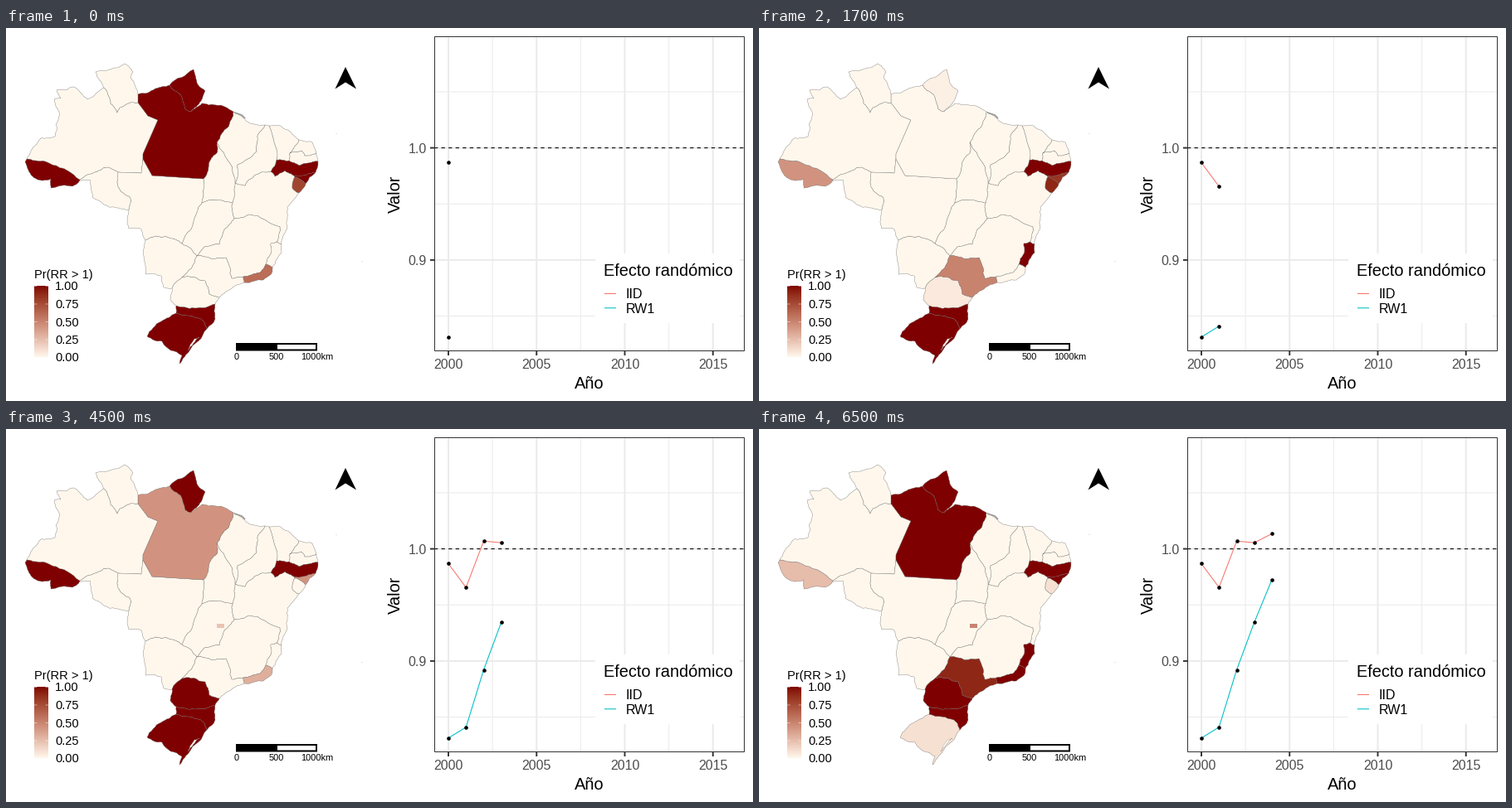
A matplotlib script for the animation above (8 s loop, 900x450 px).

```python
import random
from itertools import combinations

import matplotlib.pyplot as plt
import numpy as np
from matplotlib.animation import FuncAnimation
from matplotlib.colors import ListedColormap, to_rgb
from matplotlib.patches import Polygon, Rectangle

WIDTH, HEIGHT = 900, 450
plt.rcParams.update({"font.family": "Liberation Sans", "path.snap": False})
random.seed(7)

# Points where three or more areas meet; any two junctions that share
# two areas are the ends of the border between those areas.
JUNCTIONS = {
    "AM RR land": (118, 72), "PA RR land": (159, 80), "AM PA RR": (159, 90),
    "AP PA land": (197, 69), "AP land sea": (226, 50), "AP PA sea": (223, 101),
    "MA PA sea": (274, 101), "MA PI sea": (312, 117), "CE PI sea": (317, 118),
    "CE RN sea": (353, 135), "PB RN sea": (374, 151), "PB PE sea": (376, 161),
    "AL PE sea": (373, 174), "AL SE sea": (361, 188), "BA SE sea": (353, 199),
    "BA ES sea": (332, 261), "ES RJ sea": (321, 289), "RJ SP sea": (287, 307),
    "PR SP sea": (257, 325), "PR SC sea": (252, 333), "RS SC sea": (242, 363),
    "RS land sea": (209, 405), "RS SC land": (205, 344), "PR SC land": (205, 335),
    "MS PR land": (200, 314), "MS MT land": (168, 256), "MT RO land": (148, 219),
    "AC RO land": (89, 184), "AC AM land": (25, 158), "AC AM RO": (89, 183),
    "AM MT RO": (135, 174), "AM MT PA": (165, 158), "MT PA TO": (238, 182),
    "GO MT TO": (236, 211), "GO MS MT": (212, 260), "GO MG MS SP": (230, 275),
    "MS PR SP": (212, 301), "MG RJ SP": (286, 300), "ES MG RJ": (313, 285),
    "BA ES MG": (326, 258), "BA GO MG": (275, 230), "BA GO TO": (273, 211),
    "BA MA PI TO": (276, 187), "MA PA TO": (254, 138), "BA PE PI": (319, 173),
    "CE PE PI": (326, 159), "CE PB PE": (341, 160), "CE PB RN": (342, 151),
    "AL BA PE": (345, 177), "AL BA SE": (348, 180),
}
# Main bends between the two junctions of a border.
OUTER_BENDS = {
    "AM land": [(112, 76), (98, 86), (82, 71), (61, 75), (66, 85), (58, 86), (64, 101),
                (59, 131), (42, 133), (30, 148)],
    "RR land": [(108, 53), (143, 43), (153, 53), (150, 60)],
    "PA land": [(180, 73)],
    "AP sea": [(231, 68), (240, 76), (235, 88)],
    "PA sea": [(236, 91), (253, 93)],
    "MA sea": [(289, 112)],
    "CE sea": [(331, 118)],
    "RN sea": [(369, 138)],
    "BA sea": [(339, 216), (339, 240)],
    "ES sea": [(332, 271)],
    "RJ sea": [(320, 296), (310, 304)],
    "SP sea": [(272, 314)],
    "SC sea": [(252, 351)],
    "RS sea": [(220, 391)],
    "RS land": [(212, 395), (188, 378), (170, 372), (187, 354)],
    "PR land": [(198, 328)],
    "MS land": [(190, 313), (187, 299), (168, 297), (166, 275)],
    "MT land": [(163, 243), (148, 242)],
    "RO land": [(133, 217), (104, 204), (101, 183)],
    "AC land": [(80, 191), (54, 193), (54, 182), (38, 183), (30, 177), (23, 161)],
}
INNER_BENDS = {
    "AC AM": [(56, 165)],
    "AM RR": [(126, 91), (134, 102), (137, 96)],
    "AM PA": [(171, 106), (183, 111), (165, 152)],
    "AM RO": [(112, 172), (123, 168)],
    "AM MT": [(163, 175)],
    "AP PA": [(210, 80), (216, 98)],
    "MT RO": [(149, 204), (135, 192)],
    "MT PA": [(176, 178)],
    "MS MT": [(180, 251), (204, 255)],
    "GO MT": [(229, 225)],
    "GO MG": [(239, 264), (257, 261), (264, 242)],
    "PA TO": [(246, 160), (255, 149)],
    "MA PA": [(268, 119)],
    "MA TO": [(262, 150)],
    "MA PI": [(303, 130), (302, 149), (279, 165)],
    "BA PI": [(288, 190), (299, 178)],
    "PB RN": [(360, 154), (356, 148)],
    "PB PE": [(353, 166)],
    "BA PE": [(324, 179), (336, 172)],
    "AL PE": [(357, 178)],
    "BA SE": [(345, 193)],
    "BA MG": [(330, 240), (293, 225)],
    "ES MG": [(319, 272), (319, 260)],
    "MG RJ": [(306, 295)],
    "MG SP": [(265, 277), (272, 302)],
    "PR SP": [(245, 321), (240, 305)],
    "PR SC": [(227, 338)],
    "RS SC": [(235, 351)],
}
STRAIGHT = {"AM PA", "AM MT", "MT PA", "PA RR"}

# Probability per region and year; regions not named are zero.
USUAL = dict(AC=1, PA=1, AP=1, PE=1, AL=1, SC=1, RS=1)
YEARS = [
    dict(USUAL, SE=.78, RJ=.6),
    dict(USUAL, AC=.43, PA=0, AP=.03, AL=.84, SE=.9, ES=1, SP=.5, PR=.06),
    dict(USUAL, SE=.12, ES=.11, RJ=.06, SP=1, PR=1),
    dict(USUAL, PA=.43, AL=.43, DF=.22, RJ=.31, PR=1),
    dict(USUAL, AC=.25, SE=.1, DF=.5, ES=1, RJ=1, SP=.9, PR=1, RS=.1),
]
SERIES = [
    ([.9868, .9656, 1.0069, 1.0055, 1.0135], "#F8766D", "IID"),
    ([.8313, .8410, .8921, .9345, .9726], "#00BFC4", "RW1"),
]


def lab_gradient(low, high, steps=256):
    """Blend two colours evenly in CIE Lab, which is linear in the cube roots of XYZ."""
    to_xyz = np.array([[.4124, .3576, .1805], [.2126, .7152, .0722], [.0193, .1192, .9505]])
    white = to_xyz.sum(axis=1)

    def roots(color):
        linear = ((np.array(to_rgb(color)) + .055) / 1.055) ** 2.4
        return np.cbrt(to_xyz @ linear / white)

    blend = np.linspace(roots(low), roots(high), steps)
    linear = np.clip((white * blend ** 3) @ np.linalg.inv(to_xyz).T, 0, 1)
    return ListedColormap(np.clip(1.055 * linear ** (1 / 2.4) - .055, 0, 1))


cmap = lab_gradient("#FFF7EC", "#7F0000")


def roughen(points, depth=3):
    """Displace midpoints so an edge looks like a river or a coast."""
    for _ in range(depth):
        finer = [points[0]]
        for (x0, y0), (x1, y1) in zip(points, points[1:]):
            k = random.uniform(-.1, .1)
            finer += [((x0 + x1) / 2 - k * (y1 - y0), (y0 + y1) / 2 + k * (x1 - x0)), (x1, y1)]
        points = finer
    return points


def build_borders(codes):
    borders = {}
    bends = {**OUTER_BENDS, **INNER_BENDS}
    for pair in combinations(codes, 2):
        ends = [xy for names, xy in JUNCTIONS.items() if set(pair) <= set(names.split())]
        if len(ends) == 2:
            key = " ".join(pair)
            points = [ends[0], *bends.get(key, []), ends[1]]
            borders[pair] = points if key in STRAIGHT else roughen(points)
    return borders


def outline(code, borders):
    """Chain all borders of a region into one ring."""
    parts = [points for pair, points in borders.items() if code in pair]
    ring = list(parts.pop(0))
    while parts:
        part = next(p for p in parts if ring[-1] in (p[0], p[-1]))
        parts.remove(part)
        ring += part[1:] if part[0] == ring[-1] else part[-2::-1]
    return ring


def year_x(year):
    return 533 + (year - 2000) * 21.25


def value_y(value):
    return 144.6 + (1 - value) * 1353


# At 72 dpi one point equals one pixel.
fig = plt.figure(figsize=(WIDTH / 72, HEIGHT / 72), dpi=72, facecolor="white")
ax = fig.add_axes([0, 0, 1, 1])
ax.axis("off")


def text(x, y, label, size, color="black", **style):
    ax.text(x, y, label, size=size, color=color, va="baseline", **style)


def line(xs, ys, color, width, z=2, **style):
    return ax.plot(xs, ys, color=color, lw=width, zorder=z, solid_capstyle="butt", **style)[0]


def box(x0, y0, x1, y1, z=2, **style):
    return ax.add_patch(Rectangle((x0, y0), x1 - x0, y1 - y0, zorder=z, **style))


def draw_map():
    codes = sorted({code for names in JUNCTIONS for code in names.split()})
    borders = build_borders(codes)
    regions = {}
    for code in codes:
        if code not in ("land", "sea"):
            ring = outline(code, borders)
            regions[code] = ax.add_patch(
                Polygon(ring, ec="#666666", lw=.35, joinstyle="round"))
    regions["DF"] = box(254, 235, 263, 240, ec="none")

    lagoon = [(219, 389), (227, 375), (233, 373), (219, 389)]
    ax.add_patch(Polygon(roughen(lagoon), fc="white", ec="#888888", lw=.3))
    line([275, 284, 288], [102, 105, 109], "#999999", 1.7)
    for x, y in ((397.5, 127), (428.5, 281)):
        box(x, y, x + 1, y + 1, fc="#cccccc", ec="none")
    return regions


def draw_map_legend():
    text(34, 302, "Pr(RR > 1)", 14.67)
    ax.imshow(np.linspace(1, 0, 256)[:, None], cmap=cmap, extent=(34, 51, 397.5, 311.5),
              aspect="auto", zorder=2)
    for i in range(5):
        y = 311.5 + 21.5 * i
        text(59, y + 5, f"{1 - i / 4:.2f}", 14.67)
        for x in (34, 47.6):
            line([x, x + 3.4], [y, y], "white", .5, 3)

    ax.add_patch(Polygon([(409, 47), (422, 73.5), (409, 65.5), (396.5, 73.5)], fc="black", lw=0))
    box(278, 381, 374, 388.5, fc="white", ec="black", lw=2)
    box(278, 381, 327, 388.5, fc="black", ec="none")
    for x, label in ((278, "0"), (326, "500"), (375, "1000km")):
        text(x, 400.5, label, 11, ha="center")


def draw_chart():
    left, top, right, bottom = 516, 10, 890, 390
    for i in range(7):
        x = year_x(2000 + 2.5 * i)
        line([x, x], [top, bottom], "#ebebeb", 1 if i % 2 else 2, 1)
    for i in range(5):
        y = value_y(1.05 - .05 * i)
        line([left, right], [y, y], "#ebebeb", 2 if i % 2 else 1, 1)
    for year in range(2000, 2016, 5):
        x = year_x(year)
        line([x, x], [bottom, bottom + 5], "#333333", 1.94)
        text(x, 411, str(year), 16, "#4d4d4d", ha="center")
    for value in (1, .9):
        y = value_y(value)
        line([left - 5, left], [y, y], "#333333", 1.94)
        text(507, y + 6, f"{value:.1f}", 16, "#4d4d4d", ha="right")
    line([left, right], [value_y(1)] * 2, "black", 1.07, 3, dashes=(4, 4), dash_capstyle="butt")
    box(left + .5, top + .5, right - .5, bottom - .5, z=6, fc="none", ec="#333333", lw=1)
    text(703, 435, "Año", 20, ha="center")
    text(475, 200, "Valor", 20, ha="center", rotation=90, rotation_mode="anchor")

    box(710, 272, 884, 356, z=5, fc="white", ec="none")
    text(720, 299, "Efecto randómico", 20, zorder=7)
    for i, (_, color, label) in enumerate(SERIES):
        y = 320.5 + 17.28 * i
        line([721, 735], [y, y], color, 1.07, 7)
        text(747, y + 5.8, label, 16, zorder=7)


regions = draw_map()
draw_map_legend()
draw_chart()
curves = [line([], [], color, 1.07, 4) for _, color, _ in SERIES]
dots = [line([], [], "black", 0, 4.5, marker="o", ms=4.6, mew=0) for _ in SERIES]
ax.set_xlim(0, WIDTH)
ax.set_ylim(HEIGHT, 0)


def update(frame):
    # The opening year holds one step, every later one up to four.
    year = (frame + 3) // 4
    for code, region in regions.items():
        region.set_facecolor(cmap(float(YEARS[year].get(code, 0))))
    xs = [year_x(2000 + i) for i in range(year + 1)]
    for (values, _, _), curve, dot in zip(SERIES, curves, dots):
        ys = [value_y(v) for v in values[:year + 1]]
        curve.set_data(xs, ys)
        dot.set_data(xs, ys)
    return [*regions.values(), *curves, *dots]


animation = FuncAnimation(fig, update, frames=16, interval=500, repeat=True, repeat_delay=0)
plt.show()
```
